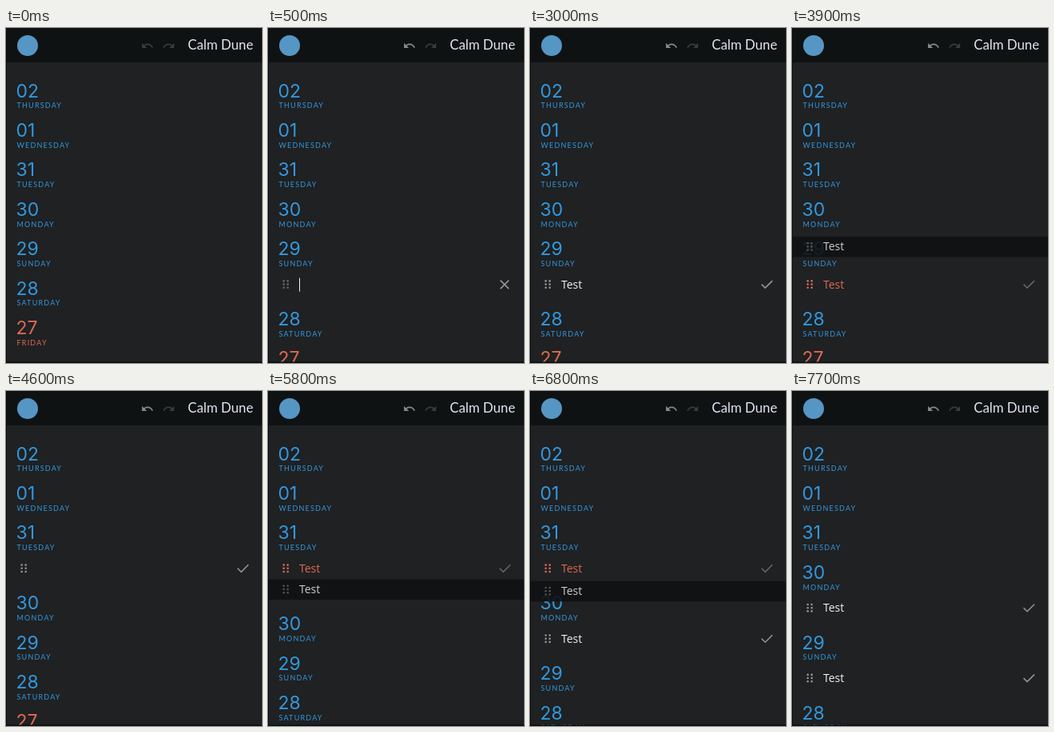
These frames come from a looping animation (320x419 px, 8 s). An HTML page with a canvas:

```html
<!DOCTYPE html>
<html lang="en">
<head>
<meta charset="utf-8">
<title>Day planner</title>
<style>
  html, body { margin: 0; height: 100%; overflow: hidden; background: #1f2123; }
  canvas { display: block; width: 320px; height: 419px; }
</style>
</head>
<body>
<canvas></canvas>
<script>
const canvas = document.querySelector('canvas');
const ctx = canvas.getContext('2d');
const dpr = window.devicePixelRatio || 1;
canvas.width = 320 * dpr;
canvas.height = 419 * dpr;

const LOOP = 8000, PITCH = 49.4, FIRST_ROW = 38.5, NEXT_ROW = 26;
const BLUE = '#3397dc', ORANGE = '#dc6a50', GREY = '#929495', DIM = '#65686a', WHITE = '#f0f1f2';
const TUE = 2, MON = 3, SUN = 4;
const days = [['02', 'THURSDAY'], ['01', 'WEDNESDAY'], ['31', 'TUESDAY'], ['30', 'MONDAY'],
  ['29', 'SUNDAY'], ['28', 'SATURDAY'], ['27', 'FRIDAY']];
const arrow = new Path2D('M12.5 8c-2.65 0-5.05.99-6.9 2.6L2 7v9h9l-3.62-3.62c1.39-1.16 3.16-1.88 ' +
  '5.12-1.88 3.54 0 6.55 2.31 7.6 5.5l2.37-.78C21.08 11.03 17.15 8 12.5 8z');

// Drag paths as [time, y] points
const drags = [
  [[3100, 321], [3900, 273.5], [4400, 222]],
  [[5500, 248], [5900, 248], [6300, 260.5], [6500, 300]],
  [[6700, 222], [7300, 390], [7450, 398]]
];

function ramp(t, from, to) {
  const p = Math.min(1, Math.max(0, (t - from) / (to - from)));
  return p * p * (3 - 2 * p);
}

function along(points, t) {
  const i = points.findIndex(p => p[0] > t);
  if (i < 1) return null;
  const [t0, y0] = points[i - 1], [t1, y1] = points[i];
  return y0 + (y1 - y0) * (t - t0) / (t1 - t0);
}

function write(str, x, y, font, color, spacing = 0, align = 'left') {
  ctx.font = font;
  ctx.letterSpacing = spacing + 'px';
  ctx.textAlign = align;
  ctx.fillStyle = color;
  ctx.fillText(str, x, y);
}

function line(color, width, ...points) {
  ctx.strokeStyle = color;
  ctx.lineWidth = width;
  ctx.beginPath();
  points.forEach(([x, y]) => ctx.lineTo(x, y));
  ctx.stroke();
}

function handle(y, color) {
  ctx.fillStyle = color;
  for (let i = 0; i < 6; i++) {
    ctx.beginPath();
    ctx.arc(i % 2 ? 24.7 : 19.7, y + (i >> 1) * 4.2 - 4.2, 1.3, 0, 7);
    ctx.fill();
  }
}

function task(y, str, { active = false, alpha = 1, editing = false, caret = false, grip = GREY } = {}) {
  ctx.globalAlpha = alpha;
  const font = '14px "Open Sans", sans-serif';
  handle(y, active ? ORANGE : grip);
  write(str, 39, y + 5, font, active ? ORANGE : WHITE);
  if (caret) {
    const x = 39.5 + Math.round(ctx.measureText(str).width);
    line(WHITE, 1, [x, y - 8], [x, y + 9]);
  }
  if (editing) {
    line(GREY, 1.6, [290.5, y - 5], [301, y + 5.5]);
    line(GREY, 1.6, [301, y - 5], [290.5, y + 5.5]);
  } else {
    line(active ? '#6a625f' : GREY, 1.6, [289.5, y], [294, y + 4.5], [303, y - 4.5]);
  }
  ctx.globalAlpha = 1;
}

function header(t) {
  ctx.fillStyle = '#0f1213';
  ctx.fillRect(0, 0, 320, 43);
  ctx.fillStyle = '#5596c4';
  ctx.beginPath();
  ctx.arc(27, 22, 13, 0, 7);
  ctx.fill();
  const icon = (x, sx, color) => {
    ctx.save();
    ctx.translate(x, 14);
    ctx.scale(sx, 0.68);
    ctx.fillStyle = color;
    ctx.fill(arrow);
    ctx.restore();
  };
  icon(168.6, 0.68, t < 500 ? '#393c3e' : '#85888a');
  icon(211.5, -0.68, '#393c3e');
  write('Calm Dune', 309, 27, '16.8px Lato, sans-serif', '#dfe6f2', 0, 'right');
}

function ghost(y) {
  ctx.fillStyle = 'rgba(15,17,19,.88)';
  ctx.fillRect(1, y - 12.5, 319, 25.5);
  handle(y, '#505355');
  write('Test', 39, y + 5, '14px "Open Sans", sans-serif', '#c9cbcd');
}

function draw(t) {
  ctx.setTransform(dpr, 0, 0, dpr, 0, 0);
  ctx.fillStyle = '#1f2123';
  ctx.fillRect(0, 0, 320, 419);

  const firstSun = ramp(t, 100, 500) - ramp(t, 4400, 4600);
  const lastSun = ramp(t, 7450, 7650);
  const tue = ramp(t, 4400, 4600) - ramp(t, 7450, 7650);
  const copy = ramp(t, 5000, 5300) - ramp(t, 6500, 6700);
  const mon = ramp(t, 6500, 6700);
  const space = {
    [TUE]: tue * FIRST_ROW + copy * NEXT_ROW,
    [MON]: mon * FIRST_ROW,
    [SUN]: (firstSun + lastSun) * FIRST_ROW
  };

  let y = 78;
  const rowY = days.map(([num, name], i) => {
    const color = i === 6 ? ORANGE : BLUE;
    write(num, 12.5, y + 8.5, '23px Inter, sans-serif', color);
    write(name, 13.5, y + 22.3, '9px Lato, sans-serif', color, 1.2);
    const row = y + 45;
    y += PITCH + (space[i] || 0);
    return row;
  });

  if (firstSun > 0) {
    const typed = Math.max(0, Math.floor((t - 1300) / 100));
    task(rowY[SUN], 'Test'.slice(0, typed), {
      alpha: firstSun,
      active: t >= 3100,
      editing: t < 2000,
      caret: t >= 300 && t < 1900 && !(t >= 1000 && t < 1200),
      grip: t < 2000 ? DIM : GREY
    });
  }
  if (tue > 0) task(rowY[TUE], t < 4700 ? '' : 'Test', { alpha: tue, active: t >= 5500 });
  if (copy > 0 && t < 5500) task(rowY[TUE] + NEXT_ROW, 'Test', { alpha: copy });
  if (mon > 0) task(rowY[MON], t < 6700 ? '' : 'Test', { alpha: mon });
  if (lastSun > 0) task(rowY[SUN], t < 7600 ? '' : 'Test', { alpha: lastSun });

  for (const path of drags) {
    const at = along(path, t);
    if (at !== null) ghost(at);
  }

  header(t);
  ctx.fillStyle = '#0b0c0d';
  ctx.fillRect(0, 0, 1, 419);
  ctx.fillRect(0, 417.5, 320, 1.5);
}

function frame() {
  draw(performance.now() % LOOP);
  requestAnimationFrame(frame);
}
frame();
</script>
</body>
</html>
```
